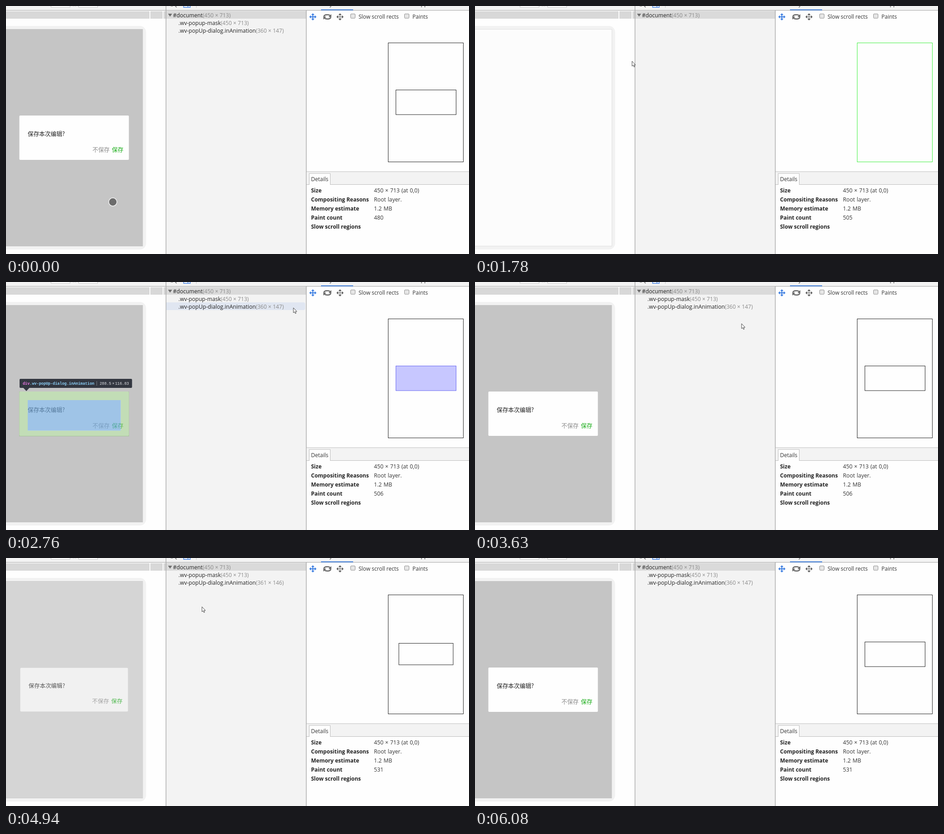
Write an HTML page that moves like this. It is 1023 px wide and 548 px high and loops after 6290 ms.

```html
<!DOCTYPE html>
<html lang="zh-CN">
<head>
<meta charset="utf-8">
<title>Layers panel</title>
<style>
  html, body { margin: 0; width: 100%; height: 100%; overflow: hidden; background: #fefefe; }
  svg { display: block; width: 1023px; height: 548px; }
  text { font: 12px "Open Sans", "Noto Sans", sans-serif; fill: #333; white-space: pre; }
  .tree text { font-size: 12.1px; fill: #222; }
  .tree .size { fill: #8a8a8a; }
  .key { font-weight: 700; fill: #222; }
  .val { font-size: 12.2px; word-spacing: .8px; }
  #dialog text { font: 12.7px "Noto Sans CJK SC", "Noto Sans CJK", sans-serif; fill: #222; }
  #tip text { font: bold 8.5px "Liberation Mono", monospace; }
  .line { fill: none; stroke: #a3a3a3; }
  .soft { stroke: #bcbcbc; }
</style>
</head>
<body>
<svg viewBox="0 0 1023 548">
  <defs>
    <path id="head" d="M0 -8L3.500 -4H-3.500Z"/>
    <g id="heads">
      <use href="#head"/>
      <use href="#head" transform="rotate(90)"/>
      <use href="#head" transform="rotate(180)"/>
      <use href="#head" transform="rotate(270)"/>
    </g>
    <g id="box">
      <rect x=".5" y=".5" width="10" height="9.500" rx="1.500" fill="#e6e6e6" stroke="#8e8e8e"/>
    </g>
    <g id="turn">
      <path d="M-7.500 -.5Q-7.500 -4.800 0 -4.800Q4 -4.800 6 -3" fill="none" stroke="#666" stroke-width="2.600"/>
      <path d="M8.800 -6V.5H2.300Z" fill="#666"/>
    </g>
  </defs>

  <!-- device view -->
  <rect width="1023" height="9" fill="#f3f3f3"/>
  <path d="M99.500 -9V3H141.500V-9M160.500 -9V3H202.500V-9" fill="#fff" stroke="#c4c4c4"/>
  <path d="M148 0h2M152 0h2" stroke="#bbb"/>
  <path class="line" d="M0 9.500H353"/>
  <path d="M0 11.500H317V28H0ZM319 11.500H346V28H319ZM348 11.500H353V28H348Z" fill="#d8d8d8"/>
  <rect x="-40" y="44" width="349.500" height="494" rx="14" fill="#f2f2f2"/>
  <rect x="-10" y="51.500" width="312.500" height="479" fill="#fcfcfc" stroke="#e0e0e0"/>
  <rect id="mask" x="-10" y="51" width="312" height="480" fill="#c5c5c5"/>
  <g id="dialog">
    <rect x="29.500" y="242" width="242" height="98" rx="2" fill="#fefefe"/>
    <text x="48" y="287">保存本次编辑?</text>
    <text x="191" y="321.500" style="fill:#8e8e8e">不保存</text>
    <text x="234" y="321.500" style="fill:#1aad19">保存</text>
  </g>
  <g id="tip">
    <path d="M29 242H272V341H29ZM48 261V328.500H253.500V261Z" fill="rgba(147,196,125,.55)" fill-rule="evenodd"/>
    <rect x="48" y="261" width="205.500" height="67.500" fill="rgba(111,168,220,.66)"/>
    <rect x="30" y="214" width="248.500" height="20" rx="2" fill="#333740"/>
    <path d="M38 233.500H52L45 241Z" fill="#333740"/>
    <text x="37" y="227" style="fill:#ee78e6">div<tspan fill="#8ed3fb">.wv-popUp-dialog.inAnimation</tspan></text>
    <path d="M200.500 219V229" stroke="#777b83"/>
    <text y="227" style="fill:#e4e6ea;font-weight:400"><tspan x="207">288.5</tspan><tspan x="234.500">×</tspan><tspan x="241">116.83</tspan></text>
  </g>

  <!-- layer tree -->
  <rect x="354" y="10" width="309" height="538" fill="#f3f3f3"/>
  <rect x="354" y="11" width="309" height="17" fill="#dadada"/>
  <path id="hover" d="M354 45H657Q661 45 661 49V58Q661 62 657 62H354Z" fill="#e0e6f1"/>
  <path d="M358 17H367L362.500 23.500Z" fill="#6e6e6e"/>
  <g class="tree">
    <text x="369" y="24.500">#document<tspan class="size">(450 × 713)</tspan></text>
    <g id="rows">
      <text x="381" y="41.500">.wv-popup-mask<tspan class="size">(450 × 713)</tspan></text>
      <text x="381" y="58.500"><tspan id="name"></tspan><tspan id="size" class="size"></tspan></text>
    </g>
  </g>

  <!-- top tabs -->
  <path class="line" d="M354 9.500H1023"/>
  <path d="M364 0H369M372 -2L377 3M374 -1L377 -2" stroke="#6e6e6e" stroke-width="1.500" fill="none"/>
  <path d="M392.500 -5V3H407V-5M402 3V-1H407" stroke="#4a86e8" stroke-width="1.500" fill="none"/>
  <path d="M420.500 0V4" stroke="#ccc"/>
  <path d="M696 8.500H767" stroke="#3b7ddd" stroke-width="2"/>
  <text x="702" y="0">Layers</text>
  <text x="909" y="0">Application</text>

  <!-- layer view -->
  <path class="line" d="M353.500 0V548M663.500 10V548" stroke-width="1.300"/>
  <g transform="translate(678 24)" fill="#3b7de0">
    <use href="#heads"/>
    <path d="M-5 0H5M0 -5V5" stroke="#3b7de0" stroke-width="2"/>
  </g>
  <g transform="translate(710 24)">
    <use href="#turn"/>
    <use href="#turn" transform="rotate(180)"/>
  </g>
  <g transform="translate(738 24)" fill="#5f5f5f">
    <use href="#heads"/>
    <path d="M-1.500 -1.500H1.500V1.500H-1.500ZM-1 -5H1V-3H-1ZM-1 3H1V5H-1ZM-5 -1H-3V1H-5ZM3 -1H5V1H3Z"/>
  </g>
  <use href="#box" x="761" y="17"/>
  <text x="779" y="28">Slow scroll rects</text>
  <use href="#box" x="880" y="17"/>
  <text x="898" y="28">Paints</text>
  <rect id="outer" x="844.500" y="81.500" width="166" height="263" fill="none"/>
  <rect id="inner"/>

  <!-- details -->
  <rect x="664" y="366" width="359" height="29" fill="#f3f3f3"/>
  <path class="line soft" d="M664 366H1023M664 394.500H1023"/>
  <path class="soft" d="M670 395V370H716.500V395" fill="#fefefe"/>
  <text x="674" y="387">Details</text>
  <g id="details"></g>

  <circle id="touch" r="9" fill="rgba(0,0,0,.45)" stroke="rgba(255,255,255,.85)" stroke-width="1.500"/>
  <path id="arrow" d="M0 0V11L2.500 8.800L4.300 12.800L6 12L4.300 8.200H7.700Z" fill="#fff" stroke="#333" stroke-width=".9"/>
</svg>
<script>
const LOOP = 6290;
const $ = id => document.getElementById(id);
const show = (el, on) => el.style.display = on ? '' : 'none';
const set = (el, attrs) => { for (const k in attrs) el.setAttribute(k, attrs[k]); };

const details = [
  ['Size', '450 × 713 (at 0,0)'],
  ['Compositing Reasons', 'Root layer.'],
  ['Memory estimate', '1.2 MB'],
  ['Paint count', ''],
  ['Slow scroll regions', '']
];
$('details').innerHTML = details.map(([k, v], i) => {
  const y = 411.5 + i * 20;
  return `<text class="key" x="674" y="${y}">${k}</text><text class="val" x="813" y="${y}">${v}</text>`;
}).join('');
const paints = $('details').children[7];

// time, dialog class, settled size, scale of the layer outline, paint count
const panel = [
  [0, 'in', true, 1, 480],
  [1000, 'out', false, 1, 480],
  [1200, '', false, 1, 505],
  [2290, 'in', false, .9, 506],
  [2480, 'in', true, 1, 506],
  [3780, 'out', false, 1, 506],
  [3930, '', false, 1, 530],
  [4870, 'in', false, .9, 531],
  [5060, 'in', true, 1, 531]
];

// time, opacity, scale
const leave = t => [[t, 1, 1], [t + 150, .29, .917], [t + 220, 0, .88]];
const enter = t => [[t, 0, .8], [t + 70, .7, .983], [t + 180, 1, 1]];
const popup = [...leave(900), ...enter(2290), ...leave(3650), ...enter(4870)];

// time, x, y
const path = [
  [30, 236, 433], [130, 290, 370], [230, 333, 270], [340, 310, 190], [480, 252, 165],
  [1300, 252, 165], [1520, 281, 127], [1580, 281, 127], [1780, 347, 122], [1810, 347, 122],
  [1870, 628, 64], [2450, 628, 64], [2700, 635, 57], [3040, 635, 57], [3420, 589, 92],
  [4280, 589, 92], [4870, 433, 108], [4940, 433, 108], [5200, 433, 56],
  [5560, 433, 56], [6080, 425, 552]
];

function tween(keys, t) {
  const i = keys.findIndex(k => k[0] > t);
  if (i === 0) return keys[0].slice(1);
  if (i < 0) return keys[keys.length - 1].slice(1);
  const a = keys[i - 1], b = keys[i];
  const p = (t - a[0]) / (b[0] - a[0]);
  return a.slice(1).map((v, j) => v + (b[j + 1] - v) * p);
}

function draw(t) {
  const [, kind, settled, outline, count] = panel.filter(s => s[0] <= t).pop();
  const [alpha, scale] = tween(popup, t);
  const [x, y] = tween(path, t);
  const open = kind !== '';
  const hover = open && x > 354 && x < 661 && y >= 45 && y <= 62;

  $('mask').style.opacity = $('dialog').style.opacity = alpha;
  set($('dialog'), { transform: `translate(150.5 291) scale(${scale}) translate(-150.5 -291)` });

  show($('rows'), open);
  show($('hover'), hover);
  show($('tip'), hover);
  $('name').textContent = `.wv-popUp-dialog.${kind}Animation`;
  $('size').textContent = settled ? '(360 × 147)' : '(361 × 146)';
  paints.textContent = count;

  set($('outer'), { stroke: open ? '#222' : '#3cf03c' });
  const w = outline < 1 ? 120 : 133;
  const h = outline < 1 ? 48 : settled ? 55 : 54;
  show($('inner'), open);
  set($('inner'), {
    x: 928 - w / 2, y: outline < 1 ? 188.5 : 185.5, width: w, height: h - .5,
    fill: hover ? '#c7c7ff' : 'none', stroke: hover ? '#6666f2' : '#222'
  });

  const inScreen = x < 302 && y > 51 && y < 531;
  show($('touch'), inScreen);
  show($('arrow'), !inScreen);
  set($(inScreen ? 'touch' : 'arrow'), { transform: `translate(${x} ${y})` });
}

const start = performance.now();
function tick(now) {
  draw(Math.max(0, now - start) % LOOP);
  requestAnimationFrame(tick);
}
draw(0);
requestAnimationFrame(tick);
</script>
</body>
</html>
```
